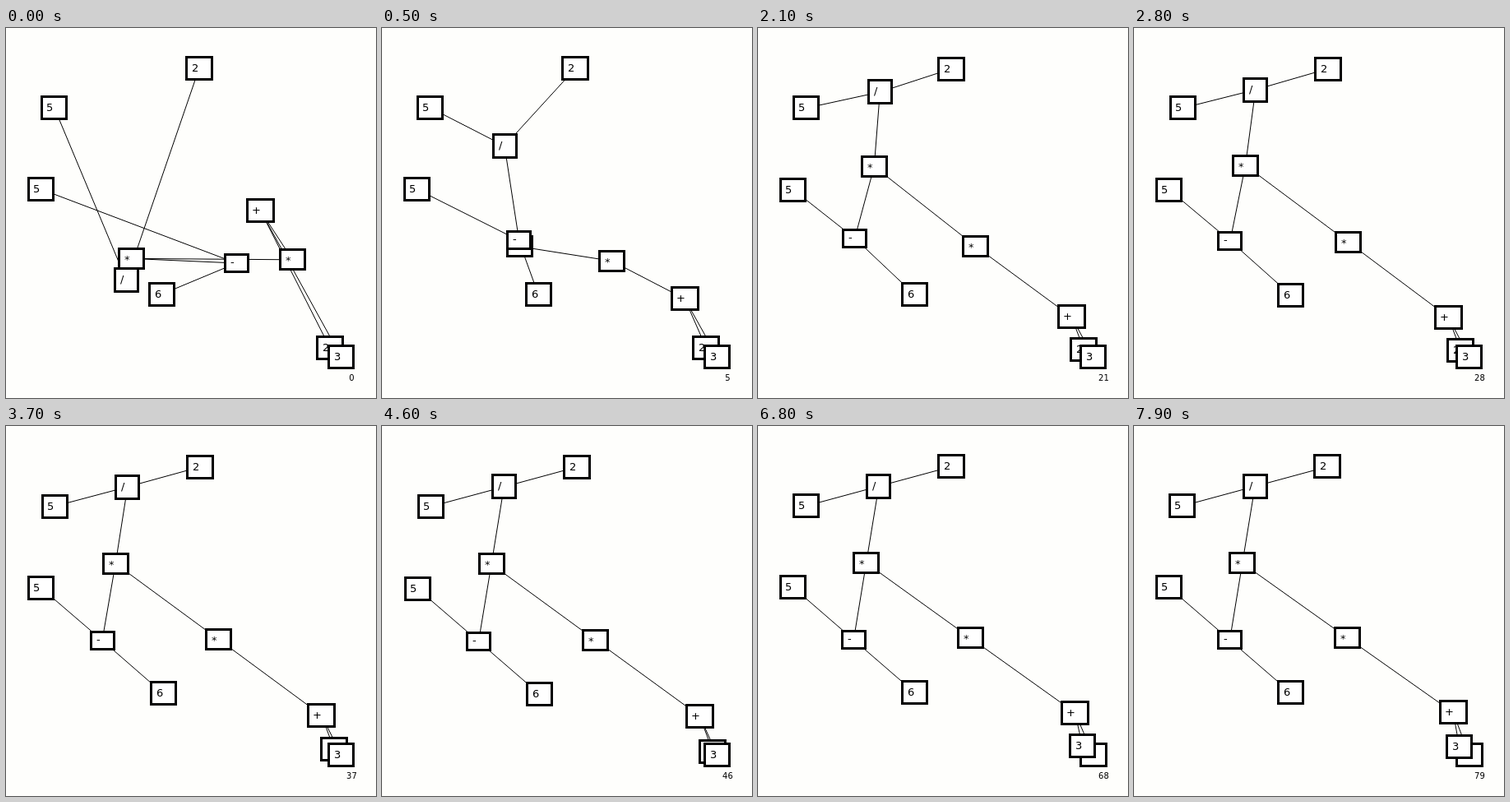
These frames come from a looping animation (450x450 px, 8000 ms). An HTML page with a canvas:

```html
<!DOCTYPE html>
<html>
<head>
<meta charset="utf-8">
<style>
html, body { margin: 0; width: 100%; height: 100%; overflow: hidden; background: #fefefc; }
canvas { display: block; }
</style>
</head>
<body>
<canvas id="stage" width="450" height="450"></canvas>
<script>
const ctx = document.getElementById('stage').getContext('2d');
const FONT = 'px "DejaVu Sans", sans-serif';
const STEPS = 80, STEP_MS = 100;

const SIZE = { '2': [31, 27], '*': [30, 24], '/': [28, 28], '-': [28, 21], '+': [32, 27] };
const DIGIT_SIZE = [30, 27];

const EDGES = ['div five', 'div two', 'div mul', 'mul sub', 'mul mul2', 'sub five2',
  'sub six', 'mul2 add', 'add low2', 'add low3'].map(e => e.split(' '));

const point = (x, y) => ({ x, y });
const mix = (a, b, u) => point(a.x + (b.x - a.x) * u, a.y + (b.y - a.y) * u);
const mid = (a, b) => mix(a, b, .5);

const five = point(58.8, 97.1), two = point(234.8, 49.4);
const five2 = point(42.6, 196.1), six = point(189.9, 323.6);
const pair = point(400.8, 394.45), reach = point(6.8, 5.45);
const divEnd = mid(five, two), subEnd = mid(five2, six), mulEnd = mid(divEnd, subEnd);

// Fading approach from start to end; larger power holds longer before moving.
function settle(start, end, step, span, power = 1) {
  return mix(end, start, Math.exp(-((step / span) ** power)));
}

// Sideways push while the inner nodes make room for each other.
function push(p, dx, dy, step) {
  const u = step / 9, bump = u * u * Math.exp(2 - 2 * u);
  return point(p.x + dx * bump, p.y + dy * bump);
}

const divAt = t => push(settle(point(146.4, 306.7), divEnd, t, 4, .83), 3, 0, t);
const subAt = t => push(settle(point(280.2, 286), subEnd, t, 4.2), 0, -13, t);
const mulAt = t => push(settle(point(152.4, 280.4), mulEnd, t, 11.4, 2.4), 24, 0, t);

// The plus swings slowly around the bottom pair.
function addAt(t) {
  const angle = .45 - .000027 * t * t;
  const end = point(pair.x - 48.5 * Math.sin(angle), pair.y - 48.5 * Math.cos(angle));
  return settle(point(309.6, 222.3), end, t, 2.8);
}

// The second product trails the middle of its two neighbours.
const trail = [point(348.4, 281.8)];
for (let t = 0; t < STEPS - 1; t++)
  trail.push(mix(trail[t], mid(mulAt(t), addAt(t)), .23));

// The bottom pair attracts by inverse square, then leaps past each other.
function pairGap(t) {
  return (t < 49 ? Math.cbrt(4913 - 101 * t) : -Math.cbrt(5268 - 97 * (t - 58))) / 17;
}

function layout(t) {
  const gap = pairGap(t), dx = reach.x * gap, dy = reach.y * gap;
  // Rescale so that the outermost node keeps its place.
  const sx = (pair.x + reach.x) / (pair.x + Math.abs(dx));
  const sy = (pair.y + reach.y) / (pair.y + Math.abs(dy));
  const node = (label, p) => ({ label, x: p.x * sx, y: p.y * sy });
  return {
    div: node('/', divAt(t)),
    mul: node('*', mulAt(t)),
    sub: node('-', subAt(t)),
    mul2: node('*', trail[t]),
    add: node('+', addAt(t)),
    five: node('5', five),
    two: node('2', two),
    five2: node('5', five2),
    six: node('6', six),
    low2: node('2', point(pair.x - dx, pair.y - dy)),
    low3: node('3', point(pair.x + dx, pair.y + dy))
  };
}

function drawBox({ label, x, y }) {
  const [w, h] = SIZE[label] || DIGIT_SIZE;
  const left = Math.floor(x - w / 2) + .5, top = Math.floor(y - h / 2) + .5;
  ctx.fillStyle = '#fff';
  ctx.fillRect(left, top, w, h);
  ctx.lineWidth = 3;
  ctx.strokeRect(left, top, w, h);
  ctx.fillStyle = '#000';
  const m = ctx.measureText(label);
  ctx.fillText(label, Math.round(left + 6 + m.actualBoundingBoxLeft),
    Math.round(top + h / 2 + (m.actualBoundingBoxAscent - m.actualBoundingBoxDescent) / 2 - .3));
}

function draw(step) {
  const nodes = layout(step);
  ctx.fillStyle = '#fefefc';
  ctx.fillRect(0, 0, 450, 450);
  ctx.strokeStyle = '#000';
  ctx.lineWidth = 1;
  ctx.beginPath();
  for (const [a, b] of EDGES) {
    ctx.moveTo(nodes[a].x, nodes[a].y);
    ctx.lineTo(nodes[b].x, nodes[b].y);
  }
  ctx.stroke();
  ctx.font = 13 + FONT;
  ctx.textAlign = 'left';
  Object.values(nodes).forEach(drawBox);
  ctx.font = 10 + FONT;
  ctx.textAlign = 'center';
  ctx.fillText(step, 420.4, 429);
}

const start = performance.now();
function tick() {
  draw(Math.floor((performance.now() - start) / STEP_MS) % STEPS);
  requestAnimationFrame(tick);
}
tick();
</script>
</body>
</html>
```
